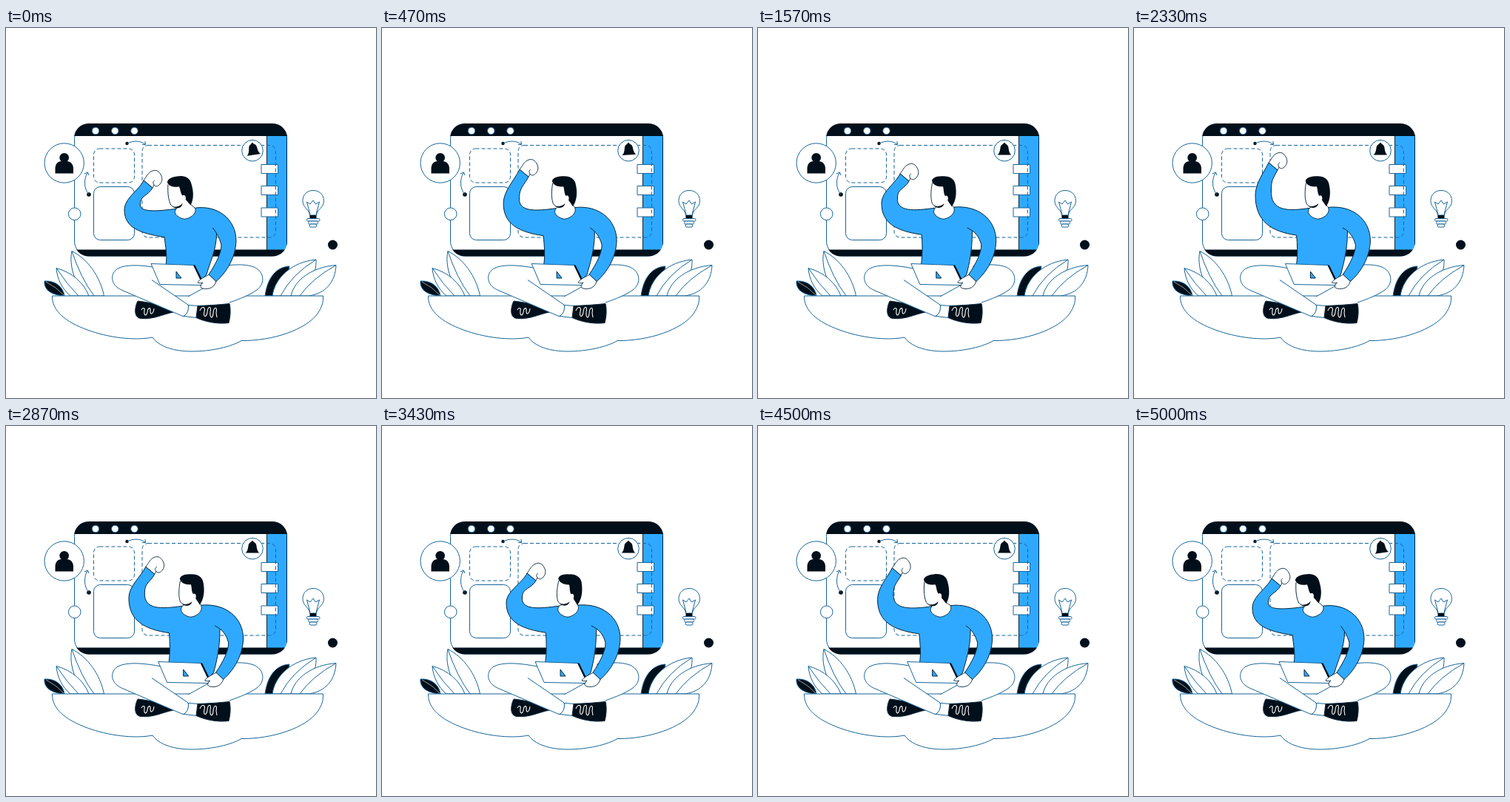
An HTML page with a canvas for the animation above (5030 ms loop, 500x500 px).

```html
<!DOCTYPE html>
<html lang="en">
<head>
<meta charset="utf-8">
<title>Cheering at the laptop</title>
<style>
html, body { margin: 0; width: 100%; height: 100%; overflow: hidden; background: #fff; }
canvas { display: block; width: 500px; height: 500px; }
</style>
</head>
<body>
<canvas id="stage"></canvas>
<script>
const LOOP = 5030;
const BLUE = '#2fa9ff', DARK = '#000f19', LINE = '#17659a', EDGE = '#04263c', WHITE = '#fff';
const canvas = document.getElementById('stage');
const ctx = canvas.getContext('2d');
const ratio = window.devicePixelRatio || 1;
canvas.width = canvas.height = 500 * ratio;

// time, wrist x/y, elbow x/y, lean, head x, head tilt, bell tilt
const poses = [
  [0,    192, 211, 160, 246, 0,   236, -12, -8],
  [930,  192, 182, 168, 228, 1,   252, 0,   0],
  [1570, 198, 202, 167, 237, .9,  248, -4,  0],
  [2330, 188, 187, 164, 226, .7,  246, -6,  0],
  [3430, 202, 204, 168, 239, .92, 250, -2,  0],
  [4030, 183, 184, 163, 224, .9,  245, -8,  7],
  [5000, 192, 211, 160, 246, 0,   236, -12, -8]
];

function poseAt(t) {
  let i = 0;
  while (i < poses.length - 2 && t >= poses[i + 1][0]) i++;
  const a = poses[i], b = poses[i + 1];
  const k = Math.min(1, (t - a[0]) / (b[0] - a[0]));
  const e = (1 - Math.cos(Math.PI * k)) / 2;
  return a.map((v, n) => v + (b[n] - v) * e);
}

function shape(d, fill, stroke, width = 1) {
  const p = new Path2D(d);
  if (fill) { ctx.fillStyle = fill; ctx.fill(p); }
  if (stroke) { ctx.strokeStyle = stroke; ctx.lineWidth = width; ctx.stroke(p); }
}

function disc(x, y, r, fill, stroke) {
  ctx.beginPath();
  ctx.arc(x, y, r, 0, Math.PI * 2);
  if (fill) { ctx.fillStyle = fill; ctx.fill(); }
  if (stroke) { ctx.strokeStyle = stroke; ctx.lineWidth = 1; ctx.stroke(); }
}

function box(x, y, w, h, r, fill, stroke, dash = []) {
  ctx.beginPath();
  ctx.roundRect(x, y, w, h, r);
  if (fill) { ctx.fillStyle = fill; ctx.fill(); }
  if (stroke) {
    ctx.setLineDash(dash);
    ctx.strokeStyle = stroke;
    ctx.lineWidth = 1;
    ctx.stroke();
    ctx.setLineDash([]);
  }
}

function placed(x, y, deg, draw) {
  ctx.save();
  ctx.translate(x, y);
  ctx.rotate(deg * Math.PI / 180);
  draw();
  ctx.restore();
}

function drawWindow() {
  box(92.5, 129.5, 287, 178.5, 20, WHITE, LINE);
  ctx.save();
  box(92, 129, 288, 179.5, 20);
  ctx.clip();
  box(352.5, 140, 27, 165, 0, BLUE, EDGE);
  box(90, 127, 294, 19, 0, DARK);
  box(90, 299.5, 294, 12, 0, DARK);
  ctx.restore();
  for (const x of [121, 147.3, 173.5]) disc(x, 139, 4.8, WHITE, LINE);
  for (const y of [184.5, 213.5, 243]) box(345, y, 22.5, 12, 0, WHITE, LINE);
  box(118.5, 163, 55, 46, 8, null, LINE, [5, 3]);
  box(184, 158.5, 180.5, 124.5, 8, null, LINE, [5, 3]);
  box(118.5, 214.5, 55, 72, 9, null, LINE);

  disc(163.5, 156, 2.2, DARK);
  shape('M164 156C172 152 181 152 188 157M184 157.5L188.5 157.5L188 153', null, LINE);
  disc(112, 225, 2.8, DARK);
  shape('M112 225C105 217 105 204 110 196M106 197L110.5 195L112 199', null, LINE);
  disc(92.7, 251.3, 8.3, WHITE, LINE);

  disc(78.7, 182.5, 26.7, WHITE, LINE);
  disc(78.7, 175.3, 6.3, DARK);
  shape('M66.5 196.5V190C66.5 184 70 180 75 180H82C87 180 91 184 91 190V196.5Z', DARK);
}

function drawBell(tilt) {
  disc(333, 165.7, 14.3, WHITE, LINE);
  placed(333, 157, tilt, () => {
    shape('M-9.5 14.5C-6.5 12.5 -6 8 -5.500 5C-5 1 -2.500 -.5 0 -.5C2.500 -.5 5 1 5.500 5C6 8 6.500 12.5 9.500 14.5Z', DARK);
    disc(0, -.6, 1.5, DARK);
  });
}

function drawBulb() {
  shape('M410.5 253C410 245 401 243 401 233.5C401 225 407 219.500 415 219.500C423 219.500 429.5 225 429.5 233.5C429.5 243 420 245 419.5 253Z', WHITE, LINE);
  shape('M411 252L406.5 235L411 238L415 233L418.500 238L423.500 235L419 252', null, LINE);
  box(410.5, 253, 9, 4, 0, DARK);
  box(406.5, 257.5, 17.5, 3.5, 1.5, WHITE, LINE);
  box(408.5, 261, 13, 4, 1.5, WHITE, LINE);
  box(410, 265, 10, 4, 2, WHITE, LINE);
  disc(441.5, 293, 6.5, DARK);
}

function drawGround() {
  shape('M79 362C77 349 66 341 52 342C51 352 59 361 79 362Z', DARK, LINE);
  shape('M54 343Q68 350 78 361', null, WHITE, .6);
  shape('M132.5 362C127 335 110 312 89 301.500C85 320 92 344 108 362Z', WHITE, LINE);
  shape('M89 301.500Q101 338 119 362', null, LINE);
  shape('M112 362C105 344 89 330 68 324.500C69 339 76 353 87 362Z', WHITE, LINE);
  shape('M68 324.500Q82 346 98 362', null, LINE);

  shape('M350 362C353 339 364 323 383 322L376 362Z', DARK, LINE);
  shape('M360 362C363 338 386 316 419 313C420 333 409 352 392 362Z', WHITE, LINE);
  shape('M419 313Q386 333 371 362', null, LINE);
  shape('M385 362C390 340 414 323 446 320.5C445 343 432 359 409 362Z', WHITE, LINE);
  shape('M446 320.5Q413 339 397 362', null, LINE);

  shape('M62.5 362C62 382 80 397 110 408C137 418 173 423 198 418C207 431 228 437 251 437C277 437 304 431 318 422.500C360 423 405 408 421 386C427 377 429 371 428.5 362Z', WHITE, LINE);
}

function drawLegs() {
  shape('M290 322C304 320 322 318 335 323C349 329 351 345 339 354C329 361 316 366 302 371L246 374L246 363L275 347Z', WHITE);
  shape('M290 322C304 320 322 318 335 323C349 329 351 345 339 354C329 361 316 366 302 371M275 347L246 363', null, LINE);
  shape('M178 369C186 370 194 371 201 373L226 384C211 387 200 394 182 392.5C172 391 174 377 178 369Z', DARK, EDGE);
  shape('M183 381C185 377 188 378 187 382C186 389 190 390 191 384C192 377 196 377 195 383C195 388 199 387 200 379', null, WHITE, 1.1);
  shape('M210 325C190 321 164 318 151 325C140 332 141 347 156 354L239 389.5C245 389 248 380 246 374L197 340.5Z', WHITE);
  shape('M210 325C190 321 164 318 151 325C140 332 141 347 156 354L239 389.5C245 389 248 380 246 374L197 340.5', null, LINE);
  shape('M246.5 374.500L260 375.500L257.5 391.5L240 389.5C245 387 247 381 246.5 374.500Z', WHITE, LINE);
  shape('M259 375.500C273 375 288 374 302 372.500C304 381 303 391 301 398.5C286 400.5 269 397 257 391.5Z', DARK, EDGE);
  shape('M262 382C265 375 270 377 268 383C266 391 271 392 272 384C273 375 278 375 276 384C275 393 280 393 280 385C281 376 286 376 284 385L285 391', null, WHITE, 1.1);
}

function drawHand(x, y) {
  placed(x, y, 0, () => {
    shape('M-6 -5C-2 -10 0 -16 6 -18C11 -20 15 -17 17 -13C20 -8 19 -3 16 0C13 4 9 3 8 1L6 5Z', WHITE, EDGE, .9);
    shape('M8 1C6 -2 7 -4 9 -5', null, EDGE, .9);
  });
}

function drawHead(x, tilt) {
  placed(x, 243.5, tilt, () => {
    shape('M-10 -35C-13 -24 -14 -14 -12 -7C-10 -3 -5 -1 1 -3L13 -2L13 -25L6 -32Z', WHITE);
    shape('M-10 -35C-13 -24 -14 -14 -12 -7C-10 -3 -5 -1 1 -3', null, EDGE, .9);
    shape('M-10 -36C-12 -41 -4 -44 4 -43C14 -43 21 -38 21 -29C22 -18 20 -8 14 -1L9 -10C11 -14 9 -18 6 -16C4 -20 5 -25 4 -29C-2 -29 -8 -31 -10 -36Z', DARK);
    shape('M-10 -4C-5 -2 0 -3 4 -6C2 0 -5 1 -10 -4Z', DARK);
  });
}

function drawBody([, wx, wy, ex, ey, lean, hx, tilt]) {
  const b = (lean - 1) * 12;
  const cx = 253 + b * .85;
  const cl = cx - 12.5, cr = cx + 12.5, cy = 243 - b * .1;
  const ux = 222 + b * .65, uy = 279 - b * .3;
  const waist = 221 + b * .4;
  const side = 290 + b * .45, crease = 283 + b * .3;
  const ix = ex + 21.5, iy = ey - 8;
  const x = n => n + b;

  drawHand(wx, wy);
  shape(`M${wx - 6} ${wy - 5}
    C${wx - 13} ${wy + 9} ${ex} ${ey - 16} ${ex} ${ey}
    C${ex} ${ey + (uy - ey) * .65} ${ex + 21} ${uy - 5} ${ux} ${uy}
    C${ux + 1} ${uy + 12} ${waist + 2} 307 ${waist} 320
    V345H${x(273)}L${x(283)} 333C${x(287)} 318 ${side} 300 ${side} 277
    L${x(294)} 256L${cr + 8} 243.5L${cr} ${cy}
    L${cl} ${cy}
    C${cl - 28} ${cy + 4} ${ix - 2} 249 ${ix} ${iy}
    C${ix} ${iy - 12} ${wx} ${wy + 16} ${wx + 6} ${wy + 5}Z`, BLUE, EDGE);

  // collar and neck
  shape(`M${hx - 7} 238L${cl} ${cy}C${cl - 7} 252 ${cx - 5} 259 ${cx} 258
    C${cx + 9} 256 ${cr + 3} 249 ${cr} ${cy - 1}L${hx + 14} 236Z`, WHITE);
  shape(`M${hx - 6} 241L${cl} ${cy}C${cl - 7} 252 ${cx - 5} 259 ${cx} 258
    C${cx + 9} 256 ${cr + 3} 249 ${cr} ${cy - 1}L${hx + 13} 238`, null, EDGE, .9);
  drawHead(hx, tilt);

  // laptop
  shape(`M${x(208)} 318.5L${x(266)} 320.5L${x(277)} 345L${x(276)} 347.5L${x(220)} 346.5Z`, WHITE, LINE);
  shape(`M${x(265)} 320.5L${x(267.5)} 320.5L${x(278.5)} 343L${x(276)} 343Z`, DARK);
  shape(`M${x(242)} 329L${x(249)} 338H${x(242)}Z`, BLUE, EDGE);

  // resting arm
  shape(`M${x(287)} 333C${x(279)} 337 ${x(273)} 340 ${x(271)} 344C${x(274)} 345 ${x(276)} 345 ${x(278)} 344
    C${x(274)} 348 ${x(274)} 351 ${x(278)} 352C${x(287)} 354 ${x(294)} 350 ${x(296)} 342Z`, WHITE, EDGE, .9);
  shape(`M${cr} ${cy - 1}C${x(298)} 239 ${x(323)} 258 ${x(323)} 288
    C${x(322)} 311 ${x(310)} 330 ${x(296)} 342.5L${x(286)} 333
    C${x(296)} 318 ${x(303)} 304 ${x(303)} 293C${x(300)} 282 ${x(295)} 275 ${crease} 270`, BLUE, EDGE);
}

function frame(now) {
  const pose = poseAt(now % LOOP);
  ctx.setTransform(ratio, 0, 0, ratio, 0, 0);
  ctx.lineJoin = 'round';
  ctx.fillStyle = WHITE;
  ctx.fillRect(0, 0, 500, 500);
  drawWindow();
  drawBell(pose[8]);
  drawBulb();
  drawGround();
  drawLegs();
  drawBody(pose);
}

const start = performance.now();
function tick() {
  frame(performance.now() - start);
  requestAnimationFrame(tick);
}
tick();
</script>
</body>
</html>
```
